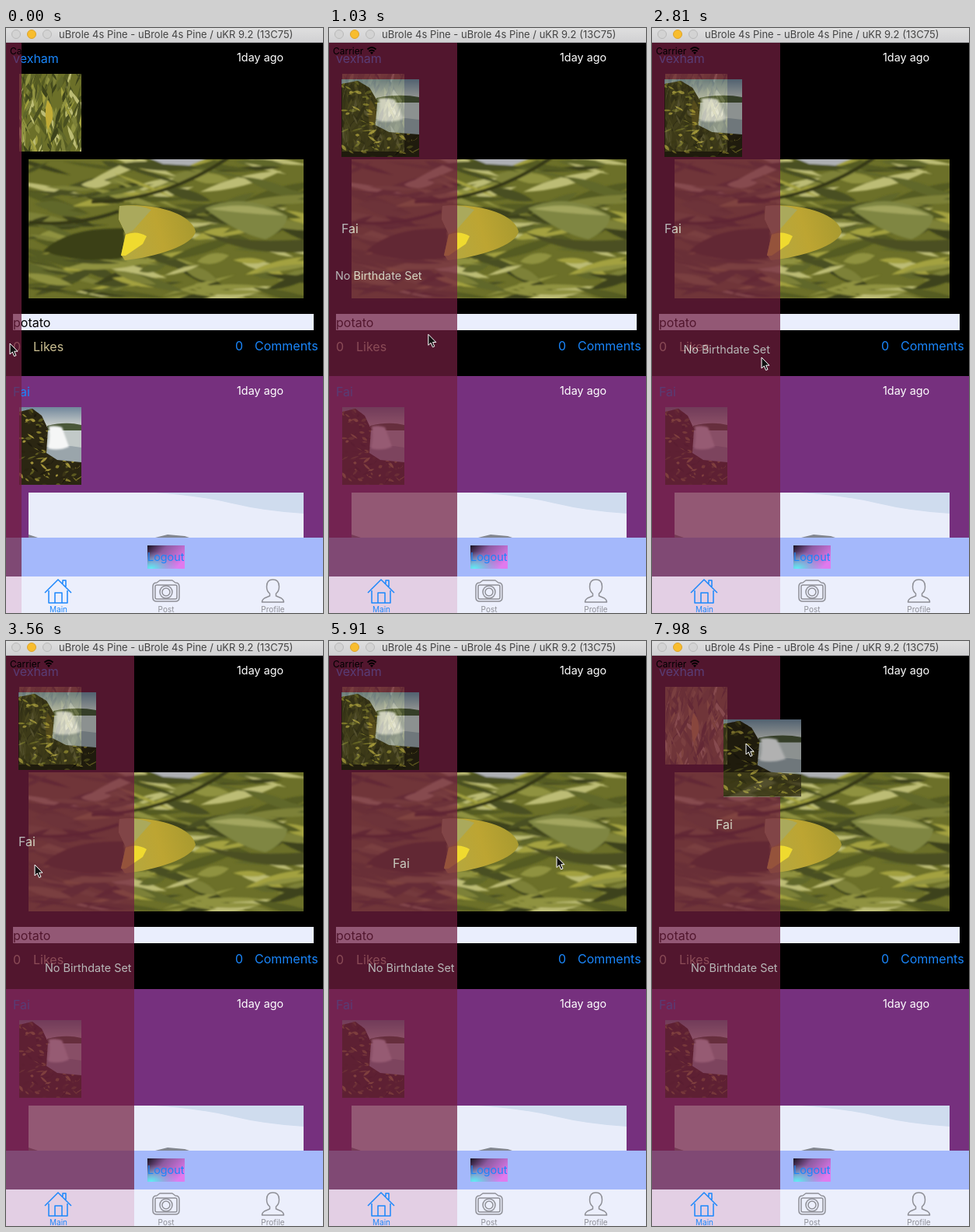
Recreate the animation shown at these times as an HTML page. Size 408 by 753 pixels, loop 8 s.

```html
<!DOCTYPE html>
<html lang="en">
<head>
<meta charset="utf-8">
<title>Draggable profile panel</title>
<style>
html, body { margin: 0; width: 100%; height: 100%; overflow: hidden; background: #000; }
svg.stage { display: block; width: 100%; height: 100%; }
text { font-family: Inter, "Open Sans", sans-serif; font-size: 16px; }
.small { font-size: 14.4px; }
.tab { font-size: 10px; text-anchor: middle; }
.blue { fill: #1a86fb; }
.line { fill: none; stroke: #8f9097; stroke-width: 1.5; stroke-linejoin: round; }
</style>
</head>
<body>
<svg class="stage" viewBox="0 0 408 753">
  <defs>
    <linearGradient id="bar" x2="0" y2="1">
      <stop stop-color="#dfdfdf"/><stop offset="1" stop-color="#d0d0d2"/>
    </linearGradient>
    <linearGradient id="sky" x2="0" y2="1">
      <stop stop-color="#71879c"/><stop offset=".25" stop-color="#cfd2cd"/><stop offset=".5" stop-color="#e4e6e4"/>
    </linearGradient>
    <linearGradient id="leaf" y1=".2" x2="1" y2="0">
      <stop stop-color="#b5a83f"/><stop offset=".45" stop-color="#bda532"/><stop offset="1" stop-color="#a5982f"/>
    </linearGradient>
    <linearGradient id="neon" x2="1" y2=".6">
      <stop stop-color="#17121f"/><stop offset=".4" stop-color="#8d5aa0"/><stop offset="1" stop-color="#e07aee"/>
    </linearGradient>
    <radialGradient id="cyan" cx=".1" cy="1" r=".75">
      <stop stop-color="#5cf0f4"/><stop offset="1" stop-color="#8cc8f4" stop-opacity="0"/>
    </radialGradient>
    <filter id="soft"><feGaussianBlur stdDeviation="1.1"/></filter>
    <clipPath id="ground"><path d="M0 6l17-4 12 9 8 17-2 31 14 9 31 3v29H0z"/></clipPath>

    <symbol id="leaves" viewBox="29 169 354 179" preserveAspectRatio="none">
      <path fill="#6c7029" d="M29 169h354v179H29z"/>
      <g filter="url(#soft)">
        <g id="foliage"></g>
        <path fill="#aeb0b4" d="M178 165h86l-28 12-34-2z"/>
        <path fill="#7f8643" d="M256 232q52-22 106 10-2 18-28 30-38-8-78-40z"/>
        <path fill="#a3a65f" d="M262 233q50-12 96 8-40-1-96-8z"/>
        <path fill="#3b4017" d="M48 287q30-31 104-29l1 38q-60 8-105-9z"/>
        <path fill="#4b5020" d="M250 262q48 16 136 10v16q-78 6-136-26z"/>
        <path fill="none" stroke="#343817" stroke-width="4" d="M110 224q96-2 176-57M29 250q60 6 116-14"/>
      </g>
      <path fill="url(#leaf)" d="M146 229c42-4 92 8 98 33-3 18-52 33-91 37l-5-7 6-27-9-19z"/>
      <path fill="#aaa95c" d="M146 229q24-2 41 5l-24 27-9 4-9-19z"/>
      <path fill="#efda2f" d="M154 266q14-6 27 2l-5 10-22 15h-6z"/>
    </symbol>

    <symbol id="hanging" viewBox="0 0 80 100">
      <path fill="#6c7029" d="M0 0h80v100H0z"/>
      <use href="#foliage" transform="translate(157 -9) rotate(90) scale(.3 .45)"/>
      <path fill="#c1ab36" d="M36 34q9 8 7 24l-6 14q-6-18-1-38z"/>
    </symbol>

    <symbol id="falls" viewBox="0 0 80 100" preserveAspectRatio="none">
      <path fill="url(#sky)" d="M0 0h80v100H0z"/>
      <path fill="#4a5738" d="M36 24q24-6 44-1v7H36z"/>
      <path fill="#c2c9c8" d="M36 30h44v24H36z"/>
      <path fill="#9aa5ab" d="M30 52q26-5 50 0v24H30z"/>
      <path fill="#f5f6f6" filter="url(#soft)" d="M38 25q9-2 17 1l9 25q-14 6-27 2 4-14 1-28z"/>
      <g clip-path="url(#ground)">
        <path fill="#2b2612" d="M0 0h80v100H0z"/>
        <g id="rocks"></g>
      </g>
    </symbol>
  </defs>

  <path d="M0 0h408v753H0z"/>
  <path fill="#76307e" d="M0 448h408v210H0z"/>

  <text class="blue" x="9" y="45">vexham</text>
  <text class="small" x="297" y="43" fill="#fff">1day ago</text>
  <use href="#hanging" x="17" y="59" width="80" height="100"/>
  <use href="#leaves" x="29" y="169" width="354" height="179"/>
  <path fill="#eaeefd" d="M9 368h387v21H9z"/>
  <text x="9" y="385">potato</text>
  <g fill="#cbbf91"><text x="9" y="416">0</text><text x="35" y="416">Likes</text></g>
  <g class="blue"><text x="295" y="415">0</text><text x="320" y="415">Comments</text></g>

  <text class="blue" x="9" y="474">Fai</text>
  <text class="small" x="297" y="472" fill="#fff">1day ago</text>
  <use href="#falls" x="17" y="488" width="80" height="100"/>
  <path fill="#e9edfa" d="M29 598h354v60H29z"/>
  <path fill="#cfdcee" d="M190 598h193v27q-50-3-92-13t-101-14z"/>
  <path fill="#82868f" d="M29 652l12 4H29zM192 656l16-4 22 2 6 2z"/>

  <path fill="#a4b8fb" d="M0 656h408v50H0z"/>
  <path fill="url(#neon)" d="M182 666h48v30h-48z"/>
  <path fill="url(#cyan)" d="M182 666h48v30h-48z"/>
  <text class="small blue" x="182" y="686">Logout</text>

  <g id="panel" opacity=".72">
    <path fill="#721f40" d="M0 19h165v687H0z"/>
    <use id="photo" href="#falls" width="100" height="100"/>
    <text id="name" fill="#fff" y="6">Fai</text>
    <text id="birth" class="small" fill="#fff" y="5">No Birthdate Set</text>
  </g>

  <path fill="#eceffc" d="M0 706h408v47H0z"/>
  <rect id="tint" y="706" height="47" fill="#d8a0c0" opacity=".4"/>
  <g class="line" style="stroke:#1a86fb">
    <path d="M50 727l17-17 17 17M55 724v16h24v-16M73 715v-4h4v8M63 740v-13h9v13"/>
  </g>
  <g class="line">
    <path d="M194 714l4-3h16l4 3q5 0 5 5v14q0 5-5 5h-24q-5 0-5-5v-14q0-5 5-5z"/>
    <rect x="192" y="717" width="28" height="18" rx="2"/>
    <circle cx="206" cy="726" r="8" fill="#eceffc"/><circle cx="206" cy="726" r="5"/>
    <path d="M343.500 710q8 0 8 9 0 6-4 9v3l7 3q3 2 3 5h-28q0-3 3-5l7-3v-3q-4-3-4-9 0-9 8-9z"/>
  </g>
  <text class="tab blue" x="67.500" y="752">Main</text>
  <g fill="#8f9097"><text class="tab" x="206" y="752">Post</text><text class="tab" x="343.500" y="752">Profile</text></g>

  <text x="5" y="34" style="font-size:12px">Carrier</text>
  <g fill="none" stroke="#000" stroke-width="1.800">
    <path d="M49.500 27.500q5.500-5 11 0M51.500 30q3.500-3 7 0"/>
    <path d="M53 31.500l2 2.500 2-2.500q-2-1.500-4 0z" fill="#000" stroke="none"/>
  </g>

  <path fill="url(#bar)" d="M0 0h408v19H0z"/>
  <path fill="#b5b5b8" d="M0 18h408v1H0z"/>
  <g fill="#d3d3d3" stroke="#b9b9b9">
    <circle cx="13" cy="8" r="5.500"/><circle cx="53" cy="8" r="5.500"/>
    <circle cx="33" cy="8" r="5.500" fill="#f8bd2e" stroke="#dca32c"/>
  </g>
  <text x="68" y="13" fill="#444" style="font-size:13px">uBrole 4s Pine - uBrole 4s Pine / uKR 9.2 (13C75)</text>

  <path id="cursor" fill="#111" stroke="#fff" d="M0 0V14L3.300 11 5.600 16.500 8 15.500 5.700 10.200H10Z"/>
</svg>

<script>
const LOOP = 8000, STEP = 147.8, OPEN = 165;
const $ = id => document.getElementById(id);

// Pointer waypoints: step, x, y.
const path = [
  [0, 5, 406], [4, 52, 404], [8, 153, 391],
  [11, 99, 322], [14, 93, 387], [19, 141, 424],
  [24, 37, 288], [26, 28, 258], [28, 98, 316], [31, 20, 354], [35, 94, 286],
  [39, 260, 283], [41, 326, 272], [43, 95, 286], [46, 95, 236],
  [47, 62, 125], [49, 84, 182], [51, 172, 215], [54, 121, 132]
];

// Where each item rests, and the steps at which it is grabbed and dropped.
const items = [
  { id: "birth", home: [8, 319], drags: [[11, 19]] },
  { id: "name", home: [16, 258], drags: [[26, 35], [43, 46]] },
  { id: "photo", home: [16, 66], drags: [[47, 55]] }
];

function pointer(step) {
  const i = path.findIndex(p => p[0] > step);
  if (i < 0) return path[path.length - 1].slice(1);
  const [t0, x0, y0] = path[i - 1], [t1, x1, y1] = path[i];
  const p = (step - t0) / (t1 - t0);
  return [x0 + (x1 - x0) * p, y0 + (y1 - y0) * p];
}

// A dragged item follows the pointer one step late.
function position({ home, drags }, step) {
  let [x, y] = home;
  for (const [grab, drop] of drags) {
    const from = pointer(grab);
    const to = pointer(Math.min(Math.max(step - 1, grab), drop));
    x += to[0] - from[0];
    y += to[1] - from[1];
  }
  return [x, y];
}

function place(id, [x, y]) {
  $(id).setAttribute("transform", `translate(${x.toFixed(1)} ${y.toFixed(1)})`);
}

// Fills a box with seeded lens shapes.
function scatter(id, { seed, count, box: [x, y, w, h], len, fat, turn, tones }) {
  const rnd = () => (seed = seed * 16807 % 2147483647) / 2147483647;
  let out = "";
  for (let i = 0; i < count; i++) {
    const l = len * (.4 + rnd()), f = fat * (.3 + rnd());
    const px = x + rnd() * w, py = y + rnd() * h, angle = (rnd() - .5) * turn;
    out += `<path fill="${tones[i % tones.length]}" transform="translate(${px} ${py}) rotate(${angle})"
      d="M${-l / 2} 0Q0 ${-f} ${l / 2} 0Q0 ${f} ${-l / 2} 0"/>`;
  }
  $(id).innerHTML = out;
}

function draw(t) {
  const step = Math.floor((t + 6) / STEP);
  const width = Math.min(OPEN, 20 + step * 25.25);
  place("panel", [width - OPEN, 0]);
  $("tint").setAttribute("width", width);
  place("cursor", pointer(step));
  for (const item of items) place(item.id, position(item, step));
}

scatter("foliage", {
  seed: 11, count: 170, box: [29, 169, 354, 179], len: 85, fat: 11, turn: 50,
  tones: ["#4a5020", "#8f9240", "#60672a", "#bcbc74", "#555b22", "#a3a13f", "#3d431a", "#7d8138"]
});
scatter("rocks", {
  seed: 5, count: 150, box: [0, 0, 80, 100], len: 9, fat: 3.5, turn: 120,
  tones: ["#5d5a20", "#1f1b0d", "#857c2c", "#3a3416", "#a1923a", "#29230f"]
});

const start = performance.now();
function tick() {
  draw((performance.now() - start) % LOOP);
  requestAnimationFrame(tick);
}
tick();
</script>
</body>
</html>
```
